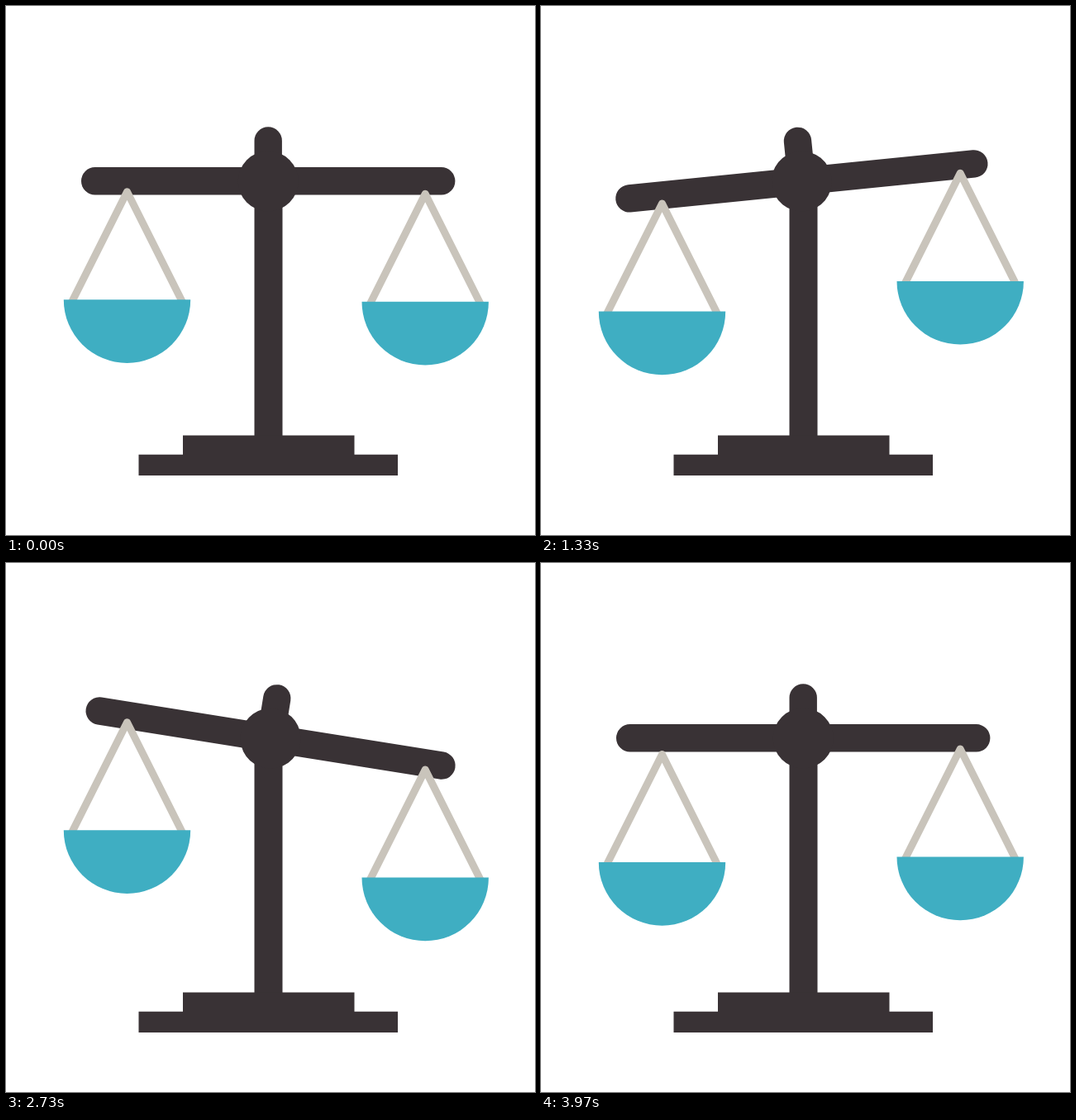
An HTML page with a canvas that plays this animation: 640 px wide and 640 px high, repeating every 4010 ms.

```html
<!DOCTYPE html>
<html lang="en">
<head>
<meta charset="utf-8">
<title>Balance scale</title>
<style>
  html, body { margin: 0; width: 100%; height: 100%; overflow: hidden; background: #fff; }
  canvas { display: block; width: 100vmin; height: 100vmin; }
</style>
</head>
<body>
<canvas id="stage" width="640" height="640"></canvas>
<script>
const ctx = document.getElementById('stage').getContext('2d');
const DARK = '#393235', TEAL = '#3faec2', CORD = '#c9c4bb';
const LOOP = 4010;
const PIVOT = { x: 317.2, y: 230 };

// Shared key times; each part has its own value at every key.
const TIMES = [0, 820, 2380, 4000];
const TILT = [0, -9.95, 9.95, 0];
const LEFT = [355.2, 383, 319.5, 362];
const RIGHT = [357.8, 319.5, 383, 355.5];

// Symmetric cubic Bezier ease (k, 0, 1 - k, 1), solved by bisection.
function ease(x, k = 0.455) {
  let lo = 0, hi = 1;
  for (let i = 0; i < 24; i++) {
    const s = (lo + hi) / 2, r = 1 - s;
    const bx = 3 * r * r * s * k + 3 * r * s * s * (1 - k) + s * s * s;
    if (bx < x) lo = s; else hi = s;
  }
  return lo * lo * (3 - 2 * lo);
}

function valueAt(keys, t) {
  if (t >= TIMES[3]) return keys[3];
  const i = t < TIMES[1] ? 0 : t < TIMES[2] ? 1 : 2;
  const p = ease((t - TIMES[i]) / (TIMES[i + 1] - TIMES[i]));
  return keys[i] + (keys[i + 1] - keys[i]) * p;
}

function bar(x1, y1, x2, y2, width) {
  ctx.lineWidth = width;
  ctx.beginPath();
  ctx.moveTo(x1, y1);
  ctx.lineTo(x2, y2);
  ctx.stroke();
}

function drawStand() {
  ctx.fillStyle = DARK;
  ctx.fillRect(300.5, 212, 34, 310);
  ctx.fillRect(214, 519.5, 207.5, 25);
  ctx.fillRect(160.5, 542.7, 313.5, 25.3);
}

function drawBeam(angle) {
  ctx.save();
  ctx.translate(PIVOT.x, PIVOT.y);
  ctx.rotate(angle * Math.PI / 180);
  ctx.fillStyle = ctx.strokeStyle = DARK;
  ctx.lineCap = 'round';
  bar(-209.5, -18.2, 209.5, -18.2, 33.4);
  bar(0, -67, 0, -18, 33.4);
  ctx.beginPath();
  ctx.arc(0, -18, 36.5, 0, Math.PI * 2);
  ctx.fill();
  ctx.restore();
}

function drawPan(x, y) {
  ctx.strokeStyle = CORD;
  ctx.lineWidth = 9;
  ctx.lineCap = 'butt';
  ctx.lineJoin = 'round';
  ctx.beginPath();
  ctx.moveTo(x - 67.5, y + 4);
  ctx.lineTo(x, y - 130.5);
  ctx.lineTo(x + 67.5, y + 4);
  ctx.stroke();
  ctx.fillStyle = TEAL;
  ctx.beginPath();
  ctx.arc(x, y, 76.7, 0, Math.PI);
  ctx.fill();
}

function draw(t) {
  ctx.fillStyle = '#fff';
  ctx.fillRect(0, 0, 640, 640);
  drawStand();
  drawBeam(valueAt(TILT, t));
  drawPan(146.5, valueAt(LEFT, t));
  drawPan(507.2, valueAt(RIGHT, t));
}

let start = null;
function tick(now) {
  if (start === null) start = now;
  draw(Math.max(0, now - start) % LOOP);
  requestAnimationFrame(tick);
}
draw(0);
requestAnimationFrame(tick);
</script>
</body>
</html>
```
